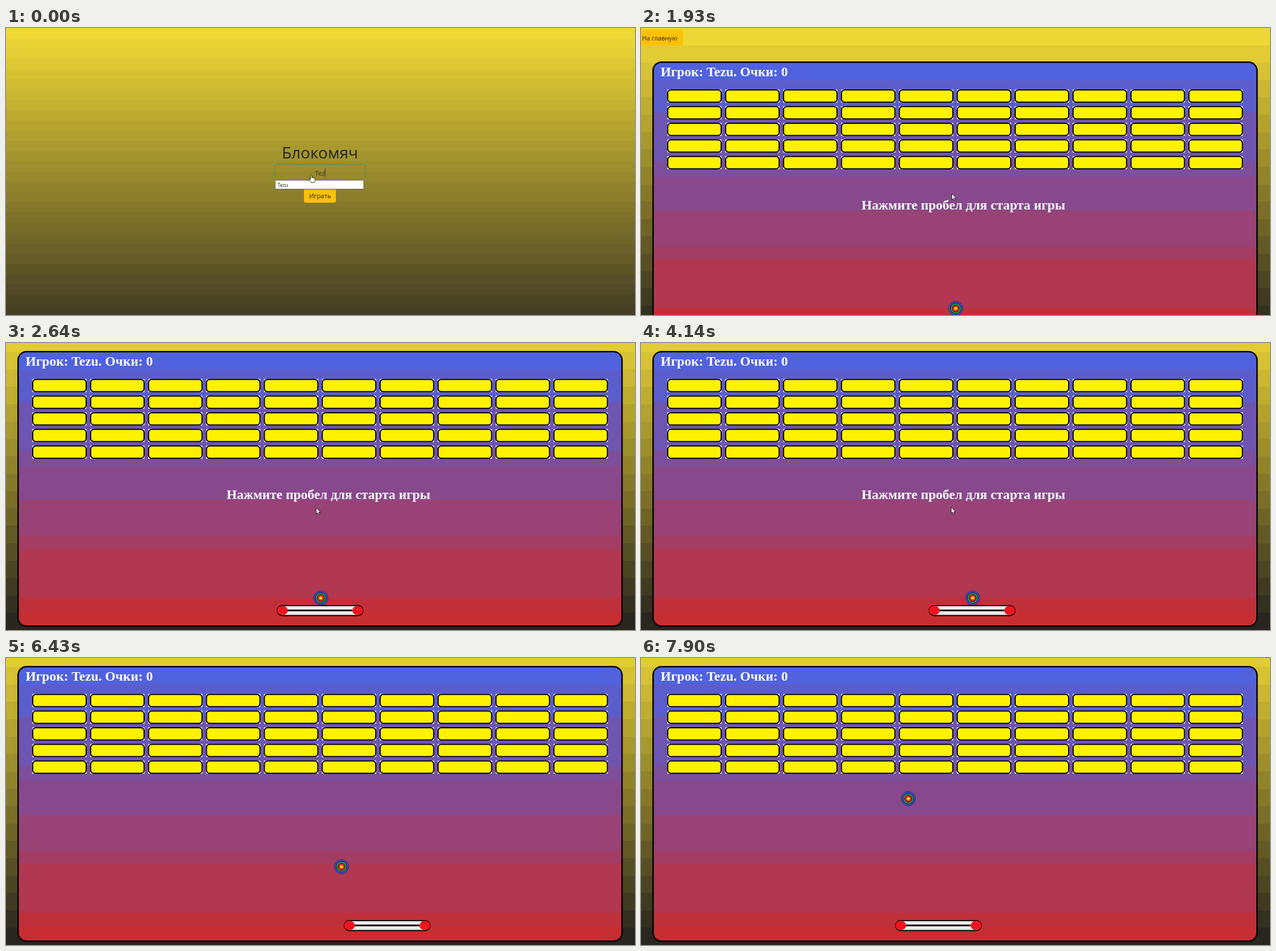
An HTML page that plays this animation: 1106x506 px, repeating every 8 s.

```html
<!DOCTYPE html>
<html lang="ru">
<head>
<meta charset="utf-8">
<title>Блокомяч</title>
<style>
html, body { margin: 0; width: 100%; height: 100%; overflow: hidden; background: #f3dc35; }
svg { display: block; width: 1106px; height: 506px; }
.ui { font-family: "Open Sans", "Noto Sans", sans-serif; fill: #212529; }
.game { font: bold 23.45px "Liberation Serif", "Times New Roman", serif; fill: #fff; }
.bands { shape-rendering: crispEdges; }
</style>
</head>
<body>
<svg viewBox="0 0 1106 506" xmlns="http://www.w3.org/2000/svg">
  <defs>
    <clipPath id="inside"><rect x="21" y="60" width="1062" height="484" rx="15"/></clipPath>
  </defs>

  <g id="menu">
    <g id="menuBg" class="bands"></g>
    <g class="ui" text-anchor="middle">
      <text x="552" y="230" font-size="28">Блокомяч</text>
      <rect id="ring" x="473" y="240" width="158.5" height="29.5" rx="4" fill="none" stroke="#718c59" stroke-width="2"/>
      <text id="field" x="552" y="260" font-size="11.3" fill="#3c3a2c"></text>
      <line id="caret" y1="248" y2="262" stroke="#2b2a22"/>
      <rect id="playBox" x="524" y="280" width="56" height="28" rx="3"/>
      <text x="552.3" y="299.5" font-size="11.3">Играть</text>
    </g>
    <g id="hint" class="ui">
      <rect x="473" y="268.5" width="157" height="17" fill="#000" opacity=".25"/>
      <rect x="473.5" y="268.5" width="155.5" height="15.5" fill="#fff" stroke="#767676"/>
      <text x="477.5" y="280" font-size="8.6" fill="#111122">Tezu</text>
    </g>
  </g>

  <g id="game">
    <g id="pageBg" class="bands"></g>
    <rect x="-4" y="3" width="78" height="28" rx="3" fill="#ffc107"/>
    <text class="ui" x="2" y="22" font-size="11">На главную</text>
    <g clip-path="url(#inside)"><g id="panelBg" class="bands"></g></g>
    <rect x="21.2" y="60.2" width="1062" height="484" rx="15" fill="none" stroke="#000" stroke-width="2.5"/>
    <g id="bricks"></g>
    <text class="game" x="34.5" y="85">Игрок: Tezu. Очки: 0</text>
    <text id="prompt" class="game" x="567" y="320" text-anchor="middle">Нажмите пробел для старта игры</text>
    <g id="paddle">
      <rect x=".8" y="508" width="151" height="17.5" rx="8.7" fill="#eee8ea" stroke="#000" stroke-width="1.8"/>
      <path d="M19 516.5H133" stroke="#000" stroke-width="3"/>
      <ellipse cx="10" cy="516.5" rx="9.5" ry="8.3" fill="#f0141e"/>
      <ellipse cx="142.5" cy="516.5" rx="9.5" ry="8.3" fill="#f0141e"/>
    </g>
    <g id="ball">
      <circle r="12.6" fill="#3f48cc" stroke="#26264a" stroke-width=".8"/>
      <circle r="9.3" fill="#22b14c" stroke="#0a0a14"/>
      <circle r="6.3" fill="#ed1c24" stroke="#0a0a0a"/>
      <circle r="2.9" fill="#ffc90e"/>
    </g>
  </g>

  <g id="cursor" fill="#fff" stroke="#000" stroke-width=".8" stroke-linejoin="round">
    <path id="arrow" d="M0 0V10.8L2.5 8.6L4.2 12.2L5.9 11.4L4.3 8H7.6Z"/>
    <path id="hand" d="M-1.2 1Q0 -.6 1.2 1V5Q2.3 4.2 3.3 5.2Q4.5 4.6 5.3 5.8Q6.8 5.4 7 7V9.5Q7 11.5 5.6 13.3H-.3Q-1.2 11.5-3.6 8.9Q-4.4 7.4-2.8 7.2L-1.2 8.4Z"/>
  </g>
</svg>
<script>
const LOOP = 8000;
const NS = "http://www.w3.org/2000/svg";
const YELLOW = [243, 220, 53];
const $ = id => document.getElementById(id);

function add(parent, tag, attrs) {
  const el = document.createElementNS(NS, tag);
  for (const k in attrs) el.setAttribute(k, attrs[k]);
  parent.appendChild(el);
}
const show = (el, on) => el.setAttribute("display", on ? "inline" : "none");
const move = (el, x, y) => el.setAttribute("transform", `translate(${x} ${y})`);

// Stepped vertical gradient: each band takes the blend at its middle.
function bands(parent, edges, from, to) {
  const top = edges[0], span = edges[edges.length - 1] - top;
  edges.slice(1).forEach((end, i) => {
    const y = edges[i], k = ((y + end) / 2 - top) / span;
    const rgb = from.map((c, n) => Math.round(c + (to[n] - c) * k));
    add(parent, "rect", { x: 0, y, width: 1106, height: end - y, fill: `rgb(${rgb})` });
  });
}
const even = (height, count) =>
  Array.from({ length: count + 1 }, (_, i) => Math.round(height * i / count));

bands($("menuBg"), even(506, 28), YELLOW, [66, 59, 36]);
bands($("pageBg"), even(551, 18), YELLOW, [35, 32, 30]);
bands($("panelBg"), [60, 92, 149, 235, 262, 322, 385, 408, 494, 519, 545], [76, 100, 228], [202, 44, 44]);

for (let row = 0; row < 5; row++) {
  for (let col = 0; col < 10; col++) {
    const x = 46 + col * 101.83, y = 108.2 + row * 29.35;
    add($("bricks"), "rect", { x: x + 0.3, y: y + 0.3, width: 95.4, height: 23, fill: "#f4f0f4" });
    add($("bricks"), "rect", { x: x + 1, y: y + 1, width: 94, height: 21.6, rx: 5.5,
      fill: "#fff200", stroke: "#000", "stroke-width": 2 });
  }
}

// The picture is redrawn in bursts, about every STEP ms from start to end.
const STEP = 135;
const bursts = [[120, 250], [670, 1640], [1790, 2050], [2360, 2640], [2910, 3130],
  [3990, 4840], [5150, 6190], [6310, 7240], [7390, 7900]];
const ticks = [0, ...bursts.flatMap(([a, b]) => {
  const n = Math.round((b - a) / STEP);
  return Array.from({ length: n + 1 }, (_, i) => a + (b - a) * i / n);
})];
const snap = t => ticks.filter(x => x <= t + 15).pop();

// 0 before a, 1 after b, linear between.
const ramp = (t, a, b) => Math.min(1, Math.max(0, (t - a) / (b - a)));
const easeOut = k => k * (2 - k);

function drawMenu(t, pointerY) {
  const field = $("field");
  field.textContent = t < 120 ? "Tez" : "Tezu";
  const x = 552.5 + field.getComputedTextLength() / 2;
  $("caret").setAttribute("x1", x);
  $("caret").setAttribute("x2", x);
  show($("caret"), t < 250);
  show($("hint"), t < 1080);
  show($("ring"), t < 1220);
  const hover = pointerY >= 280 && pointerY <= 308;
  $("playBox").setAttribute("fill", t >= 1790 ? "#d39e00" : hover ? "#e0a800" : "#ffc107");
}

function drawGame(t) {
  const launched = t >= 5150;
  const paddle = 476 + 118 * ramp(t, 3910, 4790) - 147.3 * ramp(t, 6820, 7900);
  const flight = 3.5 * ramp(t, 5150, 5280) + 78 * ramp(t, 5280, 6443) + 120 * ramp(t, 6443, 7900);
  move($("game"), 0, -45 * easeOut(ramp(t, 2220, 2640)));
  show($("prompt"), !launched);
  move($("paddle"), paddle, 0);
  // The ball rides the paddle until launch, then flies up-left at 45 degrees.
  move($("ball"), launched ? 671.5 - flight : paddle + 77.5, 494.5 - flight);
}

function draw(time) {
  const t = snap(time);
  const menu = t < 1920;
  const drift = ramp(t, 2050, 2640);
  const x = 536.5 + 10 * ramp(t, 600, 1640) - drift;
  const y = 259 + 98 * ramp(t, 600, 1085) - 65 * ramp(t, 1230, 1640) - 1.5 * drift - ramp(t, 2910, 3130);
  const isHand = t < 1000 && y < 283;

  show($("menu"), menu);
  show($("game"), !menu);
  move($("cursor"), x, y);
  show($("cursor"), t < 5390);
  show($("hand"), isHand);
  show($("arrow"), !isHand);
  if (menu) drawMenu(t, y);
  else drawGame(t);
}

function frame() {
  draw(performance.now() % LOOP);
  requestAnimationFrame(frame);
}
frame();
</script>
</body>
</html>
```
